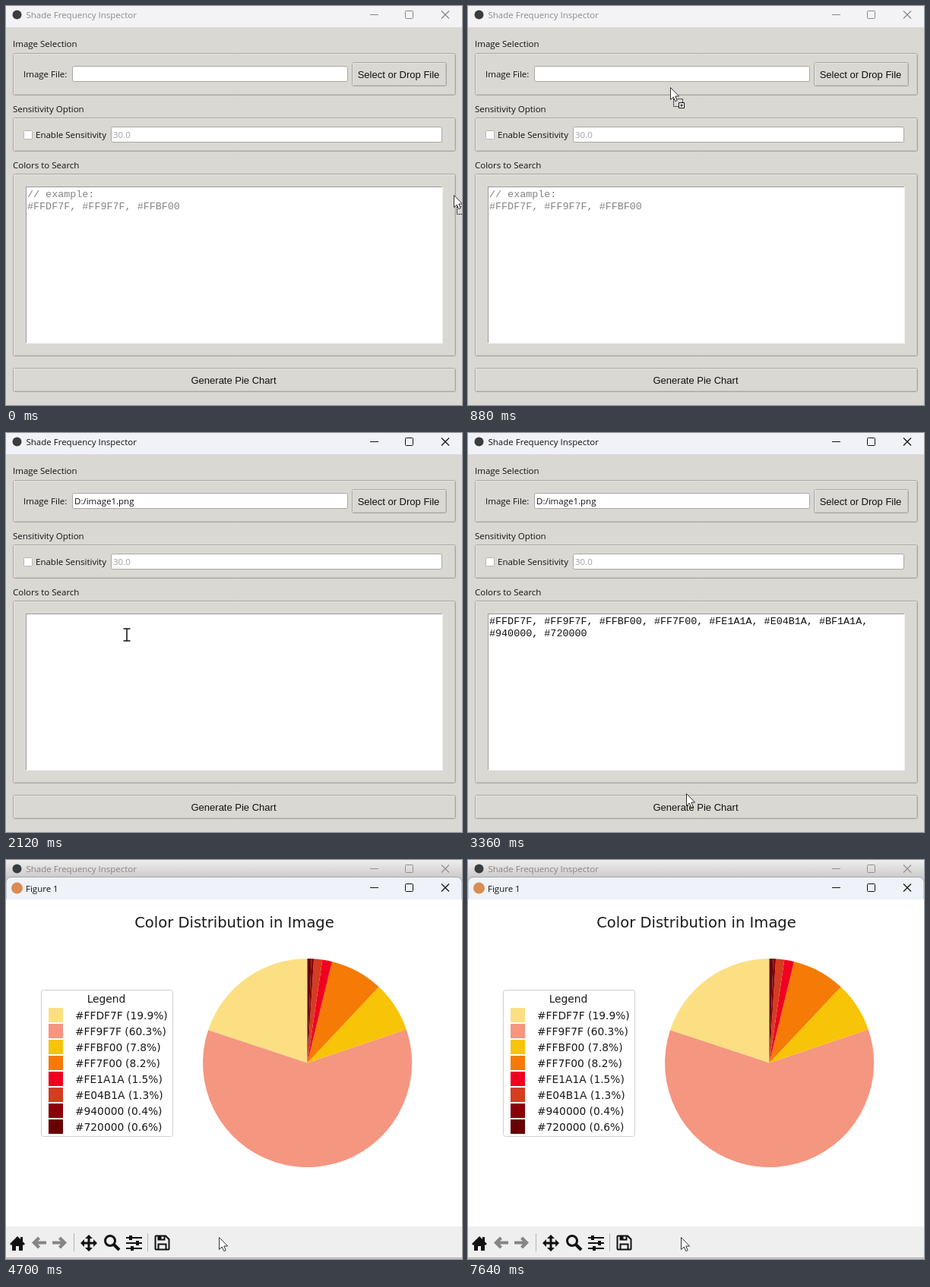
An HTML page with a canvas that plays this animation: 600x526 px, repeating every 7670 ms.

```html
<!DOCTYPE html>
<html lang="en">
<head>
<meta charset="utf-8">
<title>Shade Frequency Inspector</title>
<style>
  html, body { margin: 0; width: 100%; height: 100%; overflow: hidden; }
  canvas { display: block; width: 100vw; height: 100vh; }
</style>
</head>
<body>
<canvas id="stage" width="600" height="526"></canvas>
<script>
const ctx = document.getElementById('stage').getContext('2d');

const LOOP = 7670;
const DROP = 1200, FOCUS = 2100, PASTE = 2500, PRESS = 4300, CHART = 4700;
const APP = 'Shade Frequency Inspector';
const UI = '11.5px "Open Sans", sans-serif';
const BUTTON = '13px "Liberation Sans", Arial, sans-serif';
const CODE = '13.4px "Liberation Mono", monospace';
const LEGEND = '13.8px "DejaVu Sans", sans-serif';
const CHART_TITLE = '19.55px "DejaVu Sans", sans-serif';
const FACE = '#dad8d3', EDGE = '#a9a7a1';

// time, x, y of the pointer's hot spot
const PATH = [
  [0, 589, 249], [880, 266, 107], [1100, 258, 91], [1300, 258, 91],
  [1950, 159, 266], [2850, 159, 266], [3180, 250, 404],
  [3360, 287, 475], [3600, 280, 497], [LOOP, 280, 497]
];
const EASED = new Set([0, 3, 5]);

const SLICES = [
  ['#FFDF7F', 19.9, '#fbdf82'], ['#FF9F7F', 60.3, '#f59680'],
  ['#FFBF00', 7.8, '#f8c408'], ['#FF7F00', 8.2, '#f57b06'],
  ['#FE1A1A', 1.5, '#f00020'], ['#E04B1A', 1.3, '#d53c20'],
  ['#940000', 0.4, '#8b0008'], ['#720000', 0.6, '#680003']
];

function text(str, x, y, font, color = '#111', align = 'left') {
  ctx.font = font;
  ctx.fillStyle = color;
  ctx.textAlign = align;
  ctx.fillText(str, x, y);
}

function rect(x, y, w, h, color) {
  ctx.fillStyle = color;
  ctx.fillRect(x, y, w, h);
}

function box(x, y, w, h, fill, stroke, radius = 2) {
  ctx.beginPath();
  ctx.roundRect(x + .5, y + .5, w, h, radius);
  if (fill) { ctx.fillStyle = fill; ctx.fill(); }
  if (stroke) { ctx.strokeStyle = stroke; ctx.lineWidth = 1; ctx.stroke(); }
}

function lines(color, width, ...polylines) {
  ctx.strokeStyle = color;
  ctx.lineWidth = width;
  ctx.beginPath();
  for (const [x, y, ...rest] of polylines) {
    ctx.moveTo(x, y);
    for (let i = 0; i < rest.length; i += 2) ctx.lineTo(rest[i], rest[i + 1]);
  }
  ctx.stroke();
}

function disc(x, y, r, color) {
  ctx.fillStyle = color;
  ctx.beginPath();
  ctx.arc(x, y, r, 0, 2 * Math.PI);
  ctx.fill();
}

function shape(d, x, y, fill, stroke) {
  const path = new Path2D(d);
  ctx.save();
  ctx.translate(x, y);
  if (fill) { ctx.fillStyle = fill; ctx.fill(path, 'evenodd'); }
  if (stroke) { ctx.strokeStyle = stroke; ctx.lineWidth = 1; ctx.stroke(path); }
  ctx.restore();
}

function windowButtons(y, color) {
  lines(color, 1, [479, y, 490, y]);
  lines(color, 1.2, [573, y - 5, 583, y + 5], [583, y - 5, 573, y + 5]);
  box(525, y - 5.5, 10, 10, null, color, 1);
}

// raised panel: light inner edge at top left, dark one at bottom right
function bevel(x, y, w, h, fill) {
  const left = x + 1.5, top = y + 1.5, right = x + w - .5, bottom = y + h - .5;
  box(x, y, w, h, fill, EDGE);
  lines('#e6e4df', 1, [left, bottom, left, top, right, top]);
  lines('#c6c3bd', 1, [left, bottom, right, bottom, right, top]);
}

function group(title, y, top, bottom) {
  text(title, 9, y, UI);
  bevel(9, top, 582, bottom - top);
}

function button(label, x, y, w, h, fill = FACE) {
  bevel(x, y, w, h, fill);
  text(label, x + w / 2 - .5, y + h / 2 + 5, BUTTON, '#111', 'center');
}

function drawApp(t, pointer) {
  const active = t >= FOCUS;
  rect(0, 0, 600, 526, FACE);
  rect(0, 0, 600, 28, active ? '#f1f2f8' : '#f3f2f4');
  disc(14.5, 11.5, 6, '#3a3d40');
  text(APP, 26.5, 16, UI, active ? '#111' : '#8c8c8c');
  windowButtons(11.5, active ? '#111' : '#888');

  group('Image Selection', 54, 62, 117);
  text('Image File:', 23, 94, UI);
  box(87, 79, 362, 20, '#fff', EDGE);
  if (t >= DROP) text('D:/image1.png', 90, 94, UI);
  button('Select or Drop File', 455, 74, 124, 31);

  group('Sensitivity Option', 140, 147, 191);
  box(23, 164, 11, 11, '#fff', '#b8b6b0', 1);
  text('Enable Sensitivity', 39, 174, UI);
  box(138, 159, 435, 20, '#fff', EDGE);
  text('30.0', 141, 174, UI, '#a2a2a2');

  group('Colors to Search', 214, 221, 461);
  rect(26, 238, 549, 207, '#f0efec');
  rect(26, 238, 548, 206, '#9b9a97');
  rect(27, 239, 547, 205.5, '#fff');
  if (t < FOCUS) {
    text('// example:', 28, 252, CODE, '#858585');
    text('#FFDF7F, #FF9F7F, #FFBF00', 28, 268, CODE, '#858585');
  } else if (t >= PASTE) {
    text('#FFDF7F, #FF9F7F, #FFBF00, #FF7F00, #FE1A1A, #E04B1A, #BF1A1A,', 28, 252, CODE);
    text('#940000, #720000', 28, 268, CODE);
  }

  const hover = t > 3365 && pointer.y > 477;
  button('Generate Pie Chart', 9, 477, 582, 31, hover ? '#eeebe7' : FACE);
  if (t >= PRESS) {
    ctx.setLineDash([4, 3]);
    ctx.strokeStyle = '#222';
    ctx.lineWidth = 1.2;
    ctx.strokeRect(11.5, 479.5, 577, 27);
    ctx.setLineDash([]);
  }
}

function drawPie(cx, cy, r) {
  let angle = -Math.PI / 2;
  for (const [, share, color] of SLICES) {
    const next = angle - share / 100 * 2 * Math.PI;
    ctx.fillStyle = color;
    ctx.beginPath();
    ctx.moveTo(cx, cy);
    ctx.arc(cx, cy, r, angle, next, true);
    ctx.fill();
    angle = next;
  }
}

function drawToolbar() {
  rect(0, 483, 600, 42, '#f0eff0');
  shape('M0 10L10 0L14 4V1H17V7L20 10L18 12L17 11V19H12V13H8V19H3V11L2 12Z', 5, 496, '#111');
  const arrow = 'M0 8L8 0L11 3L8 6H19V10H8L11 13L8 16Z';
  shape(arrow, 34, 496.5, '#858585');
  ctx.save();
  ctx.scale(-1, 1);
  shape(arrow, -80, 496.5, '#858585');
  ctx.restore();
  rect(89, 492, 1, 24, '#b5b5b5');
  rect(186, 492, 1, 24, '#b5b5b5');
  shape('M11 0L16 5H12.5V9.5H17V6L22 11L17 16V12.5H12.5V17H16L11 22L6 17H9.5V12.5H5V16L0 11L5 6V9.5H9.5V5H6Z', 98, 494, '#111');
  ctx.strokeStyle = '#111';
  ctx.lineWidth = 3;
  ctx.beginPath();
  ctx.arc(137, 502, 6.5, 0, 2 * Math.PI);
  ctx.stroke();
  lines('#111', 4, [142, 507, 149, 514]);
  lines('#111', 2, [158, 498, 179, 498], [158, 505, 179, 505], [158, 512, 179, 512]);
  for (const [x, y] of [[164, 498], [173, 505], [166, 512]]) rect(x - 2, y - 3, 4, 6, '#111');
  shape('M2 0H15L20 5V18Q20 20 18 20H2Q0 20 0 18V2Q0 0 2 0ZM2 2V18H4V11H16V18H18V6L14 2V7H4V2ZM6 13V18H14V13ZM9 2V5H12V2Z', 195.5, 494.5, '#111');
}

function drawFigure() {
  const shade = ctx.createLinearGradient(0, 0, 0, 23);
  shade.addColorStop(0, '#eeeeef');
  shade.addColorStop(1, '#cbcbcc');
  rect(0, 0, 600, 526, shade);
  disc(14.5, 11.5, 6, '#3a3d40');
  text(APP, 26.5, 16, UI, '#858585');
  windowButtons(11.5, '#909090');

  box(-.5, 22, 600, 503, '#eff2f9', '#a5a6a8', 7);
  rect(0, 52, 600, 431, '#fff');
  disc(14.5, 37, 7.5, '#d98d52');
  text('Figure 1', 26, 41.5, UI);
  windowButtons(36.5, '#111');

  text('Color Distribution in Image', 300.5, 89, CHART_TITLE, '#1a1a1a', 'center');
  drawPie(396.5, 267.5, 137.5);

  box(46, 171, 173, 193, '#fff', '#cfcfcf', 3);
  text('Legend', 132, 187.5, LEGEND, '#1a1a1a', 'center');
  SLICES.forEach(([name, share, color], i) => {
    const y = 204.5 + i * 21;
    rect(56, y - 9.5, 19, 19, color);
    text(`${name} (${share}%)`, 91, y + 5, LEGEND, '#1a1a1a');
  });

  drawToolbar();
  rect(0, 524, 600, 1, '#a9a9a9');
  rect(0, 525, 600, 1, '#d5d5d5');
}

function pointerAt(t) {
  const i = PATH.findIndex((point, k) => t < PATH[k + 1][0]);
  const [t0, x0, y0] = PATH[i], [t1, x1, y1] = PATH[i + 1];
  let k = (t - t0) / (t1 - t0);
  if (EASED.has(i)) k = i === 5 ? k ** 1.5 : k * k * (3 - 2 * k);
  return { x: x0 + (x1 - x0) * k, y: y0 + (y1 - y0) * k };
}

function overText({ x, y }) {
  const inside = (l, t, r, b) => x > l && x < r && y > t && y < b;
  return inside(87, 79, 449, 100) || inside(138, 159, 574, 180) || inside(26, 238, 574, 445);
}

function drawPointer(t, pointer) {
  const x = Math.round(pointer.x), y = Math.round(pointer.y);
  const dragging = t < DROP;
  if (!dragging && t < CHART && overText(pointer)) {
    lines('#111', 1.5, [x, y - 8, x, y + 8],
      [x - 4.5, y - 8, x + 4.5, y - 8], [x - 4.5, y + 8, x + 4.5, y + 8]);
    return;
  }
  if (dragging) {
    ctx.setLineDash([2, 1]);
    ctx.strokeStyle = '#111';
    ctx.lineWidth = 1;
    ctx.strokeRect(x + 4.5, y + 15.5, 12, 10);
    ctx.setLineDash([]);
    box(x + 11, y + 20, 7, 7, '#fff', '#111', 0);
    lines('#111', 1, [x + 13, y + 24, x + 17, y + 24], [x + 15, y + 22, x + 15, y + 26]);
  }
  shape('M.5 .5V16.5L4.2 13L6.8 18.6L9.2 17.5L6.8 12H11.6Z', x, y, '#fff', '#333');
}

function frame(now) {
  const t = now % LOOP;
  const pointer = pointerAt(t);
  if (t < CHART) drawApp(t, pointer); else drawFigure();
  drawPointer(t, pointer);
  requestAnimationFrame(frame);
}
requestAnimationFrame(frame);
</script>
</body>
</html>
```
